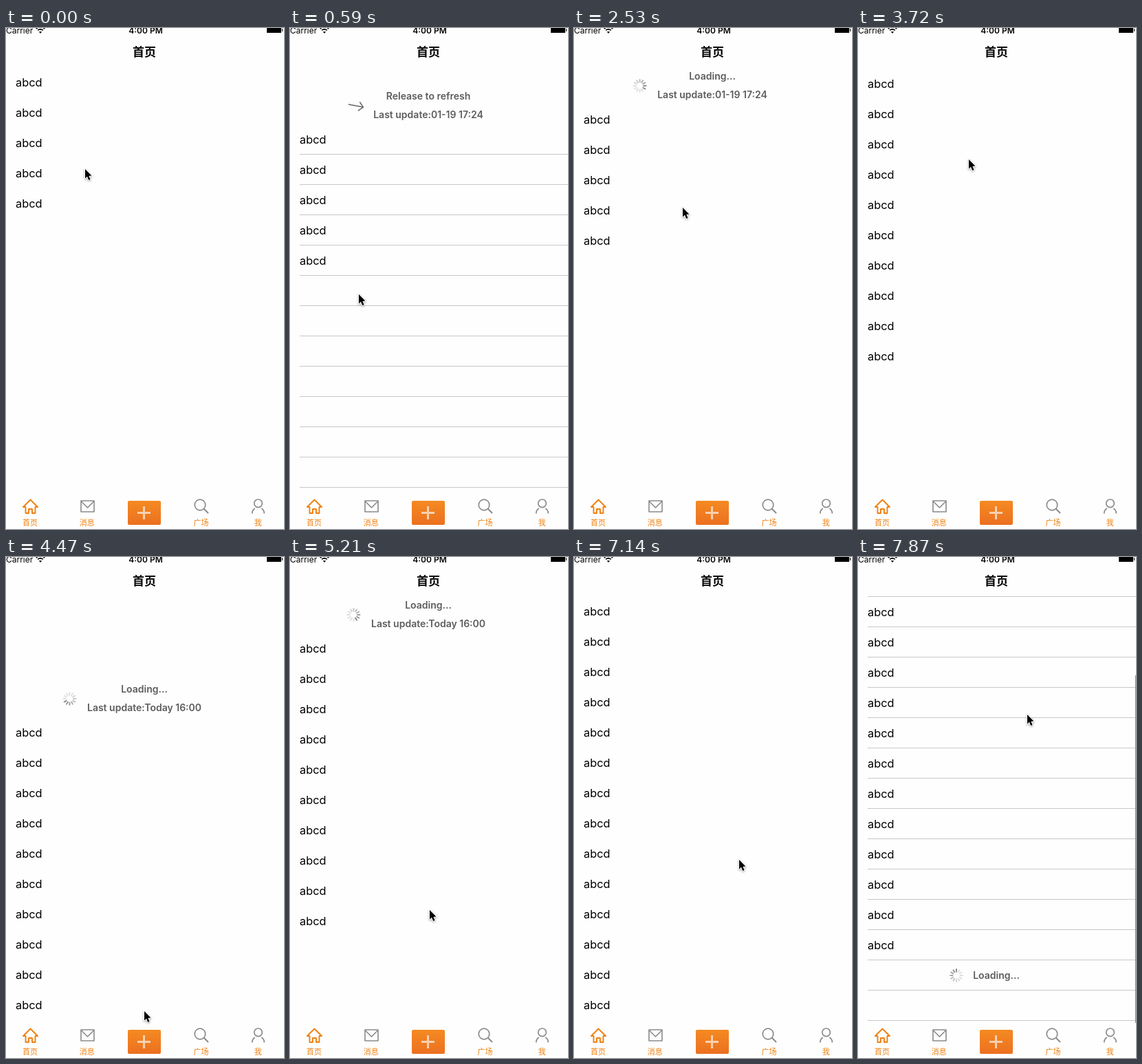
Animation, 404 px wide and 728 px high, one loop 8 s. Source, as an HTML page with a canvas:

```html
<!DOCTYPE html>
<html lang="zh">
<head>
<meta charset="utf-8">
<title>Pull to refresh</title>
<style>
html, body { margin: 0; width: 100%; height: 100%; overflow: hidden; background: #fefefe; }
canvas { display: block; width: 404px; height: 728px; }
</style>
</head>
<body>
<canvas id="stage"></canvas>
<script>
const W = 404, H = 728, LOOP = 8000, STEP = 148.5;
const NAV = 57, TABS = 680, ROW = 44, MID = 201;
const ORANGE = '#f08010', GRAY = '#8a8a8a', LABEL = '#5c5c5c', PAPER = '#fefefe';
const LATIN = 'Inter, Roboto, sans-serif';
const HAN = '"Noto Sans CJK SC", "Noto Sans CJK", sans-serif';

const canvas = document.getElementById('stage');
const ctx = canvas.getContext('2d');
const dpr = window.devicePixelRatio || 1;
canvas.width = W * dpr;
canvas.height = H * dpr;

// [time, x, y] of the pointer tip
const POINTER = [
  [0, 115, 205], [148, 114, 206], [297, 110, 248], [594, 100, 387],
  [891, 103, 480], [1188, 105, 480], [1782, 140, 350], [2230, 157, 264],
  [2524, 158, 261], [3415, 161, 195], [3712, 161, 191], [4306, 198, 691],
  [4455, 201, 660], [4603, 202, 636], [5200, 203, 512], [6534, 203, 512],
  [7128, 240, 440], [7870, 246, 229]
];
// [time, offset] while the list follows the finger
const DRAG = [
  [148, 0], [297, 25], [445, 55], [594, 83], [891, 126], [913, 126],
  [3640, 0], [3712, 2], [3861, 40], [4010, 90], [4158, 142], [4306, 194], [4383, 199]
];
const SCROLL = [[7150, 0], [7500, -70], [7870, -131]];

// Two refreshes: threshold crossed, released, finished
const PULLS = [
  { from: 0, turn: 410, release: 913, done: 3065, peak: 126, spin: -70, stamp: '01-19 17:24' },
  { from: 3600, turn: 3903, release: 4383, done: 6535, peak: 199, spin: 80, stamp: 'Today 16:00' }
];

const clamp = v => Math.max(0, Math.min(1, v));
const smooth = v => { v = clamp(v); return v * v * (3 - 2 * v); };
const inOut = v => { v = clamp(v); return v < .5 ? 2 * v * v : 1 - 2 * (1 - v) * (1 - v); };

function track(keys, t, col = 1) {
  if (t <= keys[0][0]) return keys[0][col];
  for (let i = 1; i < keys.length; i++) {
    const a = keys[i - 1], b = keys[i];
    if (t <= b[0]) return a[col] + (b[col] - a[col]) * (t - a[0]) / (b[0] - a[0]);
  }
  return keys[keys.length - 1][col];
}

function offsetAt(t, pull) {
  if (t >= 7150) return track(SCROLL, t);
  if (t >= pull.done) return 54 * (1 - inOut((t - pull.done) / 400));
  if (t >= pull.release) return pull.peak + (54 - pull.peak) * smooth((t - pull.release) / 284);
  return track(DRAG, t);
}

function text(str, x, y, font, color = '#000', align = 'center') {
  ctx.font = font;
  ctx.fillStyle = color;
  ctx.textAlign = align;
  ctx.textBaseline = 'alphabetic';
  ctx.fillText(str, x, y);
}

function path(points, close) {
  ctx.beginPath();
  points.forEach(([x, y]) => ctx.lineTo(x, y));
  if (close) ctx.closePath();
}

function stroke(color, width) {
  ctx.strokeStyle = color;
  ctx.lineWidth = width;
  ctx.stroke();
}

function box(x, y, w, h, color) {
  ctx.fillStyle = color;
  ctx.fillRect(x, y, w, h);
}

function spinner(x, y, t, phase) {
  const lead = Math.round((t / 1000 * 360 + phase) / 30);
  ctx.save();
  ctx.translate(x, y);
  ctx.lineCap = 'round';
  for (let i = 0; i < 12; i++) {
    const age = (((lead - i) % 12) + 12) % 12;
    const shade = Math.min(222, 132 + age * 13);
    const a = i * Math.PI / 6, s = Math.sin(a), c = -Math.cos(a);
    path([[s * 5.4, c * 5.4], [s * 9, c * 9]]);
    stroke(`rgb(${shade},${shade},${shade})`, 1.9);
  }
  ctx.restore();
}

function arrow(x, y, angle) {
  ctx.save();
  ctx.translate(x, y);
  ctx.rotate(angle);
  path([[-11, 0], [11, 0]]);
  stroke('#666', 1.5);
  path([[4.5, -6.5], [11, 0], [4.5, 6.5]]);
  stroke('#666', 1.5);
  ctx.restore();
}

function header(t, pull, off) {
  const y = NAV - 54 + off;
  const loading = t >= pull.release;
  const state = loading ? 'Loading...' : t >= pull.turn ? 'Release to refresh' : 'Pull down to refresh';
  const font = '600 14px ' + LATIN;
  const stamp = 'Last update:' + pull.stamp;
  text(state, MID, y + 18, font, LABEL);
  text(stamp, MID, y + 45, font, LABEL);
  const x = MID - ctx.measureText(stamp).width / 2 - 25.5;
  if (loading) spinner(x, y + 27, t, pull.spin);
  else arrow(x, y + 27, Math.PI / 2 - Math.PI * smooth((t - pull.turn) / 400));
}

function list(t, pull, off) {
  const rows = t >= PULLS[1].done ? 15 : t >= PULLS[0].done ? 10 : 5;
  ctx.save();
  ctx.beginPath();
  ctx.rect(0, NAV, W, TABS - NAV);
  ctx.clip();
  if (off > 0) header(t, pull, off);
  // hairlines only land on the pixel grid at odd offsets
  const ruled = Math.abs(off % 2) === 1;
  for (let i = 0; i < 18; i++) {
    const y = 79 + ROW * i + off;
    if (i < rows) text('abcd', 14, y + 6, '16.4px ' + LATIN, '#000', 'left');
    if (ruled) box(14, y + 21, W - 14, 1, '#c8c8c8');
  }
  if (rows === 15) {
    const y = 79 + ROW * rows + off;
    const loading = off <= -81;
    text(loading ? 'Loading...' : 'Click or drag up to refresh', MID, y + 5, '600 14px ' + LATIN, LABEL);
    if (loading) spinner(143, y, t, 40);
  }
  if (off < 0) {
    const len = 552 - Math.max(0, -off - 84);
    box(403, NAV + Math.min(68, -off * 68 / 84) + Math.max(0, -off - 84), 1, len, '#808080');
  }
  ctx.restore();
}

function statusBar() {
  text('Carrier', 0, 8, '12px ' + LATIN, '#000', 'left');
  text('4:00 PM', 203, 8, '600 12px ' + LATIN);
  for (const r of [8.5, 5.2]) {
    ctx.beginPath();
    ctx.arc(50, 7, r, -Math.PI * .76, -Math.PI * .24);
    stroke('#000', 1.7);
  }
  path([[50, 8], [47.8, 5.2], [52.2, 5.2]], true);
  ctx.fillStyle = '#000';
  ctx.fill();
  box(379, 0, 21, 7, '#000');
  box(401, 1, 1, 4, '#000');
  text('首页', MID, 41, 'bold 17px ' + HAN);
}

function tabBar() {
  const names = ['首页', '消息', '', '广场', '我'];
  names.forEach((name, i) => text(name, 35 + i * 82.8, 723, '11px ' + HAN, ORANGE));
  ctx.lineJoin = 'round';

  path([[25, 696], [35.5, 685.5], [46, 696], [42.5, 696], [42.5, 705], [38, 705],
    [38, 699], [33, 699], [33, 705], [28.5, 705], [28.5, 696]], true);
  stroke(ORANGE, 1.9);

  ctx.beginPath();
  ctx.rect(109, 687, 19, 16);
  stroke(GRAY, 1.6);
  path([[109, 687.5], [118.5, 697], [128, 687.5]]);
  stroke(GRAY, 1.6);

  const fill = ctx.createLinearGradient(0, 687, 0, 722);
  fill.addColorStop(0, '#f48a22');
  fill.addColorStop(1, '#ec7020');
  ctx.beginPath();
  ctx.roundRect(177, 687, 48, 35, 2);
  ctx.fillStyle = fill;
  ctx.fill();
  box(191, 703, 19, 3, '#fad0b0');
  box(199, 695, 3, 19, '#fad0b0');

  ctx.beginPath();
  ctx.arc(282, 693, 7.8, 0, 7);
  stroke(GRAY, 1.7);
  path([[287.5, 698.5], [294, 705]]);
  stroke(GRAY, 1.9);

  ctx.beginPath();
  ctx.arc(366.5, 690.8, 5.8, 0, 7);
  stroke(GRAY, 1.7);
  ctx.beginPath();
  ctx.arc(366.5, 705.5, 8.8, Math.PI, Math.PI * 1.32);
  stroke(GRAY, 1.7);
  ctx.beginPath();
  ctx.arc(366.5, 705.5, 8.8, -Math.PI * .32, 0);
  stroke(GRAY, 1.7);
}

function pointer(x, y) {
  ctx.save();
  ctx.translate(Math.round(x), Math.round(y));
  path([[0, 0], [0, 13.5], [3, 10.8], [5.2, 16], [7.6, 15], [5.4, 10], [9.4, 9.6]], true);
  ctx.shadowColor = 'rgba(0,0,0,.4)';
  ctx.shadowBlur = 3 * dpr;
  ctx.shadowOffsetY = dpr;
  stroke('#fff', 1.8);
  ctx.shadowColor = 'transparent';
  ctx.fillStyle = '#000';
  ctx.fill();
  ctx.restore();
}

function draw(t) {
  const pull = t < PULLS[1].from ? PULLS[0] : PULLS[1];
  ctx.setTransform(dpr, 0, 0, dpr, 0, 0);
  box(0, 0, W, H, PAPER);
  list(t, pull, Math.round(offsetAt(t, pull)));
  statusBar();
  tabBar();
  pointer(track(POINTER, t, 1), track(POINTER, t, 2));
}

const start = performance.now();
function tick() {
  const t = (performance.now() - start) % LOOP;
  draw(Math.floor((t + 7) / STEP) * STEP);
  requestAnimationFrame(tick);
}
tick();
</script>
</body>
</html>
```
